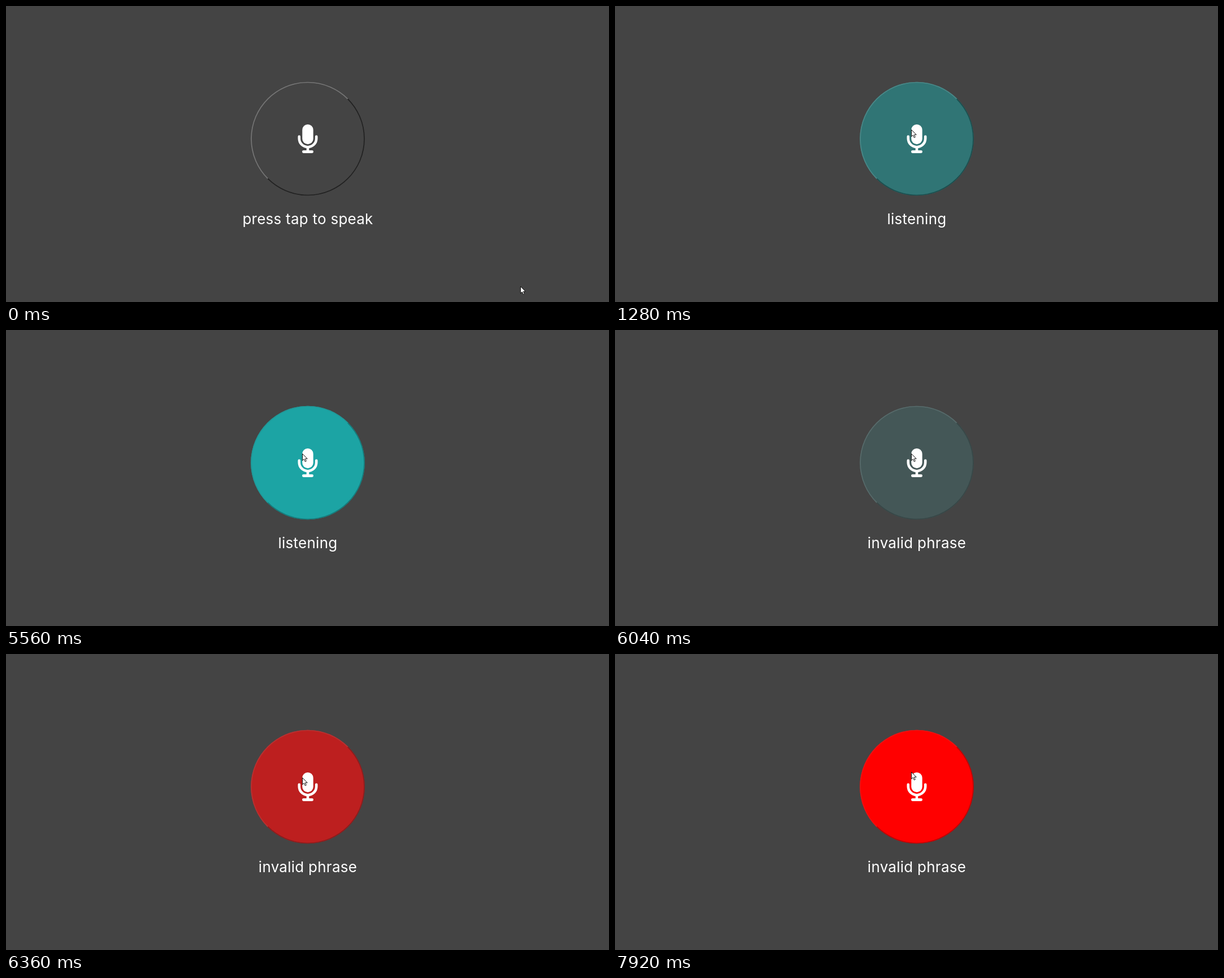
Recreate the animation shown at these times as an HTML page. Size 1067 px wide and 525 px high, loop 8000 ms.

```html
<!DOCTYPE html>
<html lang="en">
<head>
<meta charset="utf-8">
<title>Voice button</title>
<style>
  @property --face { syntax: "<color>"; inherits: true; initial-value: #444; }
  @property --lit { syntax: "<color>"; inherits: true; initial-value: #767676; }
  @property --dim { syntax: "<color>"; inherits: true; initial-value: #212121; }

  html, body { margin: 0; width: 100%; height: 100%; overflow: hidden; background: #444; }
  svg { display: block; width: 1067px; height: 525px; }

  .button { animation: state 8s infinite; }
  .face { fill: var(--face); }
  .edge { fill: none; stroke-width: 1.7; }
  .lit { stroke: var(--lit); }
  .dim { stroke: var(--dim); }
  .mic { fill: #fff; }
  .cradle { fill: none; stroke: #fff; stroke-width: 4.6; stroke-linecap: round; }

  text {
    font: 400 26px Inter, "Open Sans", sans-serif;
    font-optical-sizing: none;
    letter-spacing: .25px;
    text-anchor: middle;
    fill: #fff;
    visibility: hidden;
    animation: 8s step-end infinite;
  }
  .idle { animation-name: idle; }
  .hearing { animation-name: hearing; }
  .failed { animation-name: failed; }

  .pointer {
    fill: #fff;
    stroke: #111;
    stroke-width: 1;
    stroke-linejoin: round;
    animation: pointer 8s step-end infinite;
  }

  /* grey, teal while listening, an interrupted fade, then red */
  @keyframes state {
    0%, 12.4375% {
      --face: #444; --lit: #767676; --dim: #212121;
      animation-timing-function: ease;
    }
    24.9375%, 68.625% {
      --face: rgb(26, 169, 169); --lit: rgb(30, 155, 155); --dim: rgb(20, 125, 125);
      animation-timing-function: cubic-bezier(.357, .087, .471, .648);
    }
    74.65% {
      --face: rgb(58, 92, 92); --lit: rgb(80, 112, 112); --dim: rgb(48, 75, 75);
      animation-timing-function: ease;
    }
    87.15%, 100% {
      --face: #f00; --lit: rgb(235, 20, 20); --dim: rgb(180, 8, 8);
    }
  }

  @keyframes idle {
    0% { visibility: visible; }
    11%, 100% { visibility: hidden; }
  }
  @keyframes hearing {
    0% { visibility: hidden; }
    11% { visibility: visible; }
    74.5%, 100% { visibility: hidden; }
  }
  @keyframes failed {
    0% { visibility: hidden; }
    74.5%, 100% { visibility: visible; }
  }

  @keyframes pointer {
    0% { transform: translate(910px, 497px); }
    1% { transform: translate(800px, 450px); }
    2% { transform: translate(560px, 330px); }
    3% { transform: translate(400px, 235px); }
    4% { transform: translate(365px, 209px); }
    4.5% { transform: translate(460px, 213px); }
    5% { transform: translate(524px, 219px); }
    98% { transform: translate(524px, 214px); }
    99%, 100% { transform: translate(524px, 209px); }
  }
</style>
</head>
<body>
<svg viewBox="0 0 1067 525">
  <g class="button" transform="translate(534 235.5)">
    <circle class="face" r="100.8"/>
    <g transform="rotate(-45)">
      <path class="edge lit" d="M-100 0A100 100 0 0 1 100 0"/>
      <path class="edge dim" d="M100 0A100 100 0 0 1 -100 0"/>
    </g>
  </g>

  <rect class="mic" x="524.3" y="210" width="19.4" height="35.2" rx="9.7"/>
  <path class="cradle" d="M518.8 231.5V235A15.2 15.2 0 0 0 549.2 235V231.5M534 251V257"/>
  <rect class="mic" x="524" y="256" width="20" height="5" rx="2.4"/>

  <text class="idle" x="534" y="387">press tap to speak</text>
  <text class="hearing" x="534" y="387">listening</text>
  <text class="failed" x="534" y="387">invalid phrase</text>

  <path class="pointer" d="M.5 .5V12.6L3.3 10L5.3 14.5L7.3 13.6L5.4 9.3H9.2Z"/>
</svg>
</body>
</html>
```
